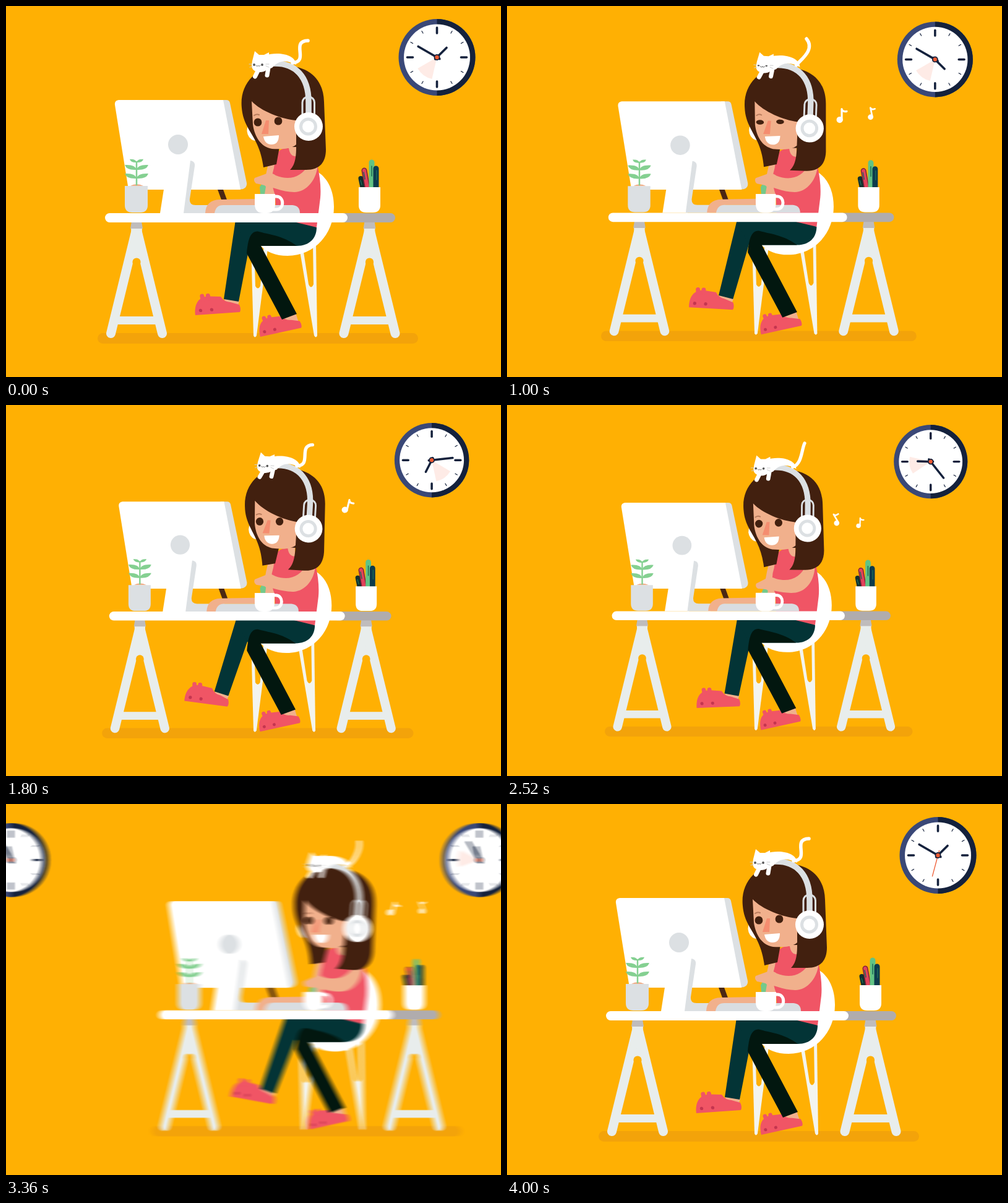
These frames come from a looping animation (800 by 600 pixels, 4.04 s). An HTML page:

```html
<!DOCTYPE html>
<html lang="en">
<head>
<meta charset="utf-8">
<title>Working day</title>
<style>
html, body { margin: 0; height: 100%; overflow: hidden; background: #ffb003 }
svg { display: block; width: 100%; height: 100% }
.skin { fill: #f1b08c }
.hair { fill: #42200f }
.grey { fill: #dce0e3 }
.pink { fill: #f05565 }
.teal { fill: #033436 }
.bg { fill: #ffb003 }
.line { fill: none; stroke-linecap: round; stroke-linejoin: round }
.w { fill: #fff }
</style>
</head>
<body>
<svg viewBox="0 0 800 600">
<defs>
  <filter id="blur" filterUnits="userSpaceOnUse" x="-60" y="0" width="920" height="600" color-interpolation-filters="sRGB">
    <feConvolveMatrix id="smear" order="3 1" kernelMatrix="1 1 1" edgeMode="none" preserveAlpha="false"/>
  </filter>
  <g id="trestle">
    <path d="M202 358H220L218 414H204Z" fill="#e8edec"/>
    <path d="M209.5 366L169.5 529.5M212.5 366L252.5 529.5" class="line" stroke="#e8edec" stroke-width="15"/>
    <path d="M178 502H244V515H178Z" fill="#e8edec"/>
    <circle cx="211" cy="414" r="6.6" class="bg"/>
    <path d="M203 348H219L221 360H201Z" fill="#bfbcbc"/>
  </g>
  <g id="slipper">
    <path d="M0 0C-1 -20 9 -30 24 -29L43 -27Q48 -18 58 -17L72 -12Q75 -4 72 0Z" class="pink"/>
    <path d="M14 -24L13 -30M23 -25L22.5 -30" class="line" stroke="#f05565" stroke-width="7"/>
    <g fill="#c4354f"><circle cx="9" cy="-7" r="2.7"/><circle cx="27" cy="-7" r="2.7"/></g>
  </g>
  <g id="leaves" fill="#84d091">
    <path id="leaf" d="M0 0Q2 -9 19 -8Q16 1 0 0Z"/>
    <use href="#leaf" transform="scale(-1 1)"/>
  </g>
  <g id="note">
    <circle cy="8" r="5.2" class="w"/>
    <path d="M3.5 8L1.5 -10Q3 -5 10 -7" class="line" stroke="#fff" stroke-width="3.2"/>
  </g>
</defs>

<rect width="800" height="600" class="bg"/>
<g id="camera">
<g id="main"><g id="scene">
  <rect x="148" y="529" width="518" height="17" rx="8.5" fill="#f3a30a"/>

  <!-- chair -->
  <g fill="#f3f4ee">
    <path d="M396 385H424L405 533Q402 538 400 533Z"/>
    <path d="M473 385H501L503 533Q501 538 498 533Z"/>
  </g>
  <path d="M401 385H417L411 453Q407 460 403 453ZM479 385H496L497 450Q493 459 489 450Z" class="bg"/>
  <path d="M500 266C521 277 530 300 530 325C530 370 497 404 455 404C436 404 420 398 410 386L490 345Z" class="w"/>

  <!-- legs -->
  <g id="shin">
    <g id="foot">
      <path d="M354 472L377 476L374 489L351 487Z" class="skin"/>
      <use href="#slipper" transform="translate(306 500) rotate(-4)"/>
    </g>
    <path d="M371 346L352 474L376 478L394 385L402 350Z" class="teal"/>
  </g>
  <path d="M372 343H470L502 358C502 376 490 388 470 388H412L394 392L371 352Z" class="teal"/>
  <path d="M446 504L468 496L473 512L450 518Z" class="skin"/>
  <use href="#slipper" transform="translate(411 535) rotate(-12.4) scale(.94)"/>
  <path d="M389 400C391 380 394 364 407 364.5C422 369 448 371 470 388H412L470 498L446 507Z" fill="#02170f"/>

  <use href="#trestle"/>
  <use href="#trestle" x="376.5"/>

  <!-- computer -->
  <path d="M341 294H350L358 316H349Z" fill="#4a2713"/>
  <path d="M345 152H356Q361 152 362 157L389 286Q390 293 383 296L376 297Z" class="grey"/>
  <path d="M182 152H351L379 297H198L176 160Q175 153 182 152Z" class="w"/>
  <circle cx="278" cy="224" r="16" class="grey"/>
  <path d="M256 290H300L290 335H249Z" class="w"/>
  <path d="M298 250Q306 251 305 259L297 312Q296 322 306 322H326V335H287Z" class="grey"/>

  <!-- plant -->
  <path d="M201 291Q211 285 222 291Z" class="skin"/>
  <path d="M192 291H229V322Q229 334 217 334H204Q192 334 192 322Z" class="grey"/>
  <path d="M211 252V289" class="line" stroke="#84d091" stroke-width="2.5"/>
  <use href="#leaves" transform="translate(211 253) scale(.58 .65)"/>
  <use href="#leaves" transform="translate(211 265)"/>
  <use href="#leaves" transform="translate(211 279)"/>

  <!-- pens -->
  <g class="line">
    <path d="M577 296L573.5 279" stroke="#12302c" stroke-width="8"/>
    <path d="M584 294L579 266" stroke="#7d2338" stroke-width="9"/>
    <path d="M584 294L579 266" stroke="#e2435a" stroke-width="6"/>
    <path d="M591 294V253" stroke="#62c384" stroke-width="9"/>
    <path d="M598 294V263" stroke="#0d3b4c" stroke-width="9"/>
    <path d="M591 275V259M580 280L578 269M599 281V266M575 289L573 282" stroke="#1c6a58" stroke-width="1.5"/>
  </g>
  <path d="M570 293H605V322Q605 334 593 334H582Q570 334 570 322Z" class="w"/>

  <!-- body -->
  <path d="M424 255H440V306L405 322H352Q342 325 339 335H322Q323 314 345 313L402 312L415 300L421 268Z" class="skin"/>
  <path d="M450 215H469V245H450Z" class="skin"/>
  <path d="M436 243Q441 229 457 230Q459 243 468 243L503 256Q510 287 508 310L502 358L465 349H437L435 306Q426 282 433 262Z" class="pink"/>
  <path d="M337 335Q339 322 351 322H463Q475 323 475 335Z" fill="#d9dde1"/>
  <g id="arm">
    <path d="M414 286L420 292L418 304H411L410 293Z" fill="#74c98b"/>
    <path d="M504 252C504 280 486 301 466 301C446 301 428 291 404 287Q399 283 402 278L424 270Q431 270 436 274C458 283 478 277 489 256Z" class="skin"/>
  </g>
  <path d="M434 308H437C450 308 450 329 437 329H432" class="line" stroke="#fff" stroke-width="5"/>
  <path d="M402 304H435V320Q435 335 421 335H416Q402 335 402 320Z" class="w"/>

  <!-- head -->
  <g id="head">
    <ellipse cx="400" cy="204" rx="10" ry="14" transform="rotate(-20 400 204)" class="w"/>
    <path d="M381 165C377 128 402 97 446 96C490 96 513 118 514 155L517 232C517 255 505 265 485 265H459C466 258 469 248 469 228H442L437 256L416 261C414 245 410 232 404 220C396 203 383 190 381 165Z" class="hair"/>
    <path d="M397 154C412 170 445 183 469 185V224C462 231 445 232 430 231C412 228 402 212 399 192Z" class="skin"/>
    <path d="M420 185H425L424 207H413Z" fill="#f58d70"/>
    <path d="M401 177Q405 174 409 176" class="line" stroke="#b97c5d" stroke-width="2"/>
    <g class="hair"><ellipse class="eye" cx="407" cy="188" rx="6.4"/><ellipse class="eye" cx="440" cy="186" rx="6.4"/></g>
    <path d="M416 211L441 209C441 220 436 224 429 224C421 224 417 218 416 211Z" class="w"/>

    <g class="line" stroke="#dce0e3">
      <path d="M431 93C468 91 489 115 489 155V180" stroke-width="9.5"/>
      <rect x="479" y="147" width="19.5" height="50" rx="9" stroke-width="3"/>
    </g>
    <circle cx="489" cy="195" r="23" class="w"/>
    <circle cx="488.5" cy="195" r="12" fill="none" stroke="#dce0e3" stroke-width="5"/>

    <path id="tail" class="line" stroke="#fff" stroke-width="5.5"/>
    <path d="M418 80C440 73 468 78 469 95C452 86 440 88 430 100L418 104Z" class="w"/>
    <path d="M408 103L402.5 114M424 100L422 112" class="line" stroke="#fff" stroke-width="7"/>
    <path d="M398 89L402 73L409 79H417L425 75L426 94Q423 107 410 107Q397 106 397 96Z" class="w"/>
    <g fill="#555"><ellipse class="cat" cx="401" cy="95" rx="1.9"/><ellipse class="cat" cx="414" cy="95" rx="1.9"/></g>
    <path d="M404 96Q406 99 407.5 96Q409 99 411 96" class="line" stroke="#777" stroke-width="1"/>
    <path d="M393 94H397M394 99L398 98M420 94H425M420 97L425 99" class="line" stroke="#ccc" stroke-width="1"/>
  </g>
  <g id="notes"></g>

  <!-- desk top -->
  <path d="M540 342.5H621.5" class="line" stroke="#b0acad" stroke-width="15"/>
  <path d="M167.5 342.5H544.5" class="line" stroke="#fff" stroke-width="15"/>

  <!-- clock -->
  <g transform="translate(696.5 83)">
    <circle r="62" fill="#3a4877"/>
    <path d="M0 -62A62 62 0 0 1 0 62Z" fill="#14213c"/>
    <circle r="53.5" class="w"/>
    <g id="ticks" stroke="#14213c" stroke-linecap="round"></g>
    <path id="sweep" fill="#f9a48c" opacity=".22"/>
    <path id="hour" d="M0 4V-22" class="line" stroke="#14213c" stroke-width="3.6"/>
    <path id="minute" d="M0 5V-35" class="line" stroke="#14213c" stroke-width="3.6"/>
    <path id="second" d="M0 8V-35" class="line" stroke="#ee5a32" stroke-width="1.3"/>
    <circle r="5" fill="#14213c"/>
    <circle r="3.2" fill="#ee5a32"/>
  </g>
</g></g>
<use id="ghost" href="#scene"/>
</g>
</svg>
<script>
const FRAME = 40, LOOP = 4040, CYCLE = 4000;
const $ = id => document.getElementById(id);
const set = (id, name, value) => $(id).setAttribute(name, value);
const turn = (id, angle, pivot = '0 0') => set(id, 'transform', `rotate(${angle} ${pivot})`);
const mix = (a, b, k) => a + (b - a) * k;
const swing = (t, n) => (1 - Math.cos(2 * Math.PI * n * t / CYCLE)) / 2;

$('ticks').innerHTML = Array.from({length: 12}, (_, i) => i % 3
  ? `<path d="M0 -45V-49" stroke-width="1.2" transform="rotate(${i * 30})"/>`
  : `<path d="M0 -39V-48" stroke-width="3.6" transform="rotate(${i * 30})"/>`).join('');

const zoomKeys = [[0, 1], [2600, .959], [3250, .959], [3680, .982], [3960, 1], [LOOP, 1]];
function zoom(t) {
  const i = zoomKeys.findIndex(k => k[0] > t);
  const [t0, a] = zoomKeys[i - 1], [t1, b] = zoomKeys[i];
  return mix(a, b, (t - t0) / (t1 - t0));
}

// Eased progress of the sideways whip: a Bezier timing curve, solved by bisection
function pan(t) {
  const u = Math.min(1, Math.max(0, (t - 3000) / 1000));
  const x = s => 3 * .814 * s * (1 - s) ** 2 + 3 * .408 * s * s * (1 - s) + s ** 3;
  if (u === 0 || u === 1) return u;
  let low = 0, high = 1;
  for (let i = 0; i < 30; i++) {
    const mid = (low + high) / 2;
    if (x(mid) < u) low = mid; else high = mid;
  }
  return low * low * (3 - 2 * low);
}

// start, life, x, y, speed x, speed y, angle, spin, size
const notes = [
  [560, 1380, 533, 183, .0175, -.02, -38, .1, 1],
  [2380, 1380, 533, 183, .0175, -.02, -38, .1, 1],
  [560, 860, 578, 183, .027, -.0274, 12, -.04, .85],
  [2380, 1180, 572, 189, .027, -.0274, 12, -.03, .85]
];
function noteMarkup(t) {
  return notes.map(([start, life, x, y, vx, vy, angle, spin, size]) => {
    const p = t - start;
    if (p <= 0 || p >= life) return '';
    const scale = size * Math.min(1, .4 + p / 300);
    const fade = Math.min(1, (life - p) / 120);
    return `<use href="#note" opacity="${fade}" transform="translate(${x + vx * p} ${y + vy * p}) rotate(${Math.min(20, angle + spin * p)}) scale(${scale})"/>`;
  }).join('');
}

function drawClock(t) {
  turn('hour', 45 + .09 * t);
  turn('minute', 300 + 1.08 * t);
  const still = t === CYCLE, start = 193 + 2.16 * t;
  turn('second', 195);
  set('second', 'visibility', still ? 'visible' : 'hidden');
  const point = a => [36 * Math.sin(a * Math.PI / 180), -36 * Math.cos(a * Math.PI / 180)];
  set('sweep', 'd', still ? '' : `M0 0L${point(start)}A36 36 0 0 1 ${point(start + 47)}Z`);
}

function drawCamera(t) {
  const s = zoom(t), p = pan(t), gap = 757 + .103 * (t - 3360);
  const place = x => `translate(${400 + x} 300) scale(${s}) translate(-400 -300)`;
  const moving = p > 0 && p < 1;
  set('main', 'transform', place(moving ? (p - 1) * gap : 0));
  set('ghost', 'transform', place(p * gap));
  set('ghost', 'visibility', moving ? 'visible' : 'hidden');

  // Even smear over half a frame of travel, always an odd number of pixels
  const travel = (pan(t + 10) - pan(t - 10)) * gap;
  const width = 2 * Math.round(travel / 2) + 1;
  if (width > 1) {
    set('smear', 'order', `${width} 1`);
    set('smear', 'kernelMatrix', Array(width).fill(1).join(' '));
    set('camera', 'filter', 'url(#blur)');
  } else $('camera').removeAttribute('filter');
}

function draw(t) {
  const bob = swing(t, 3);
  turn('shin', 10.5 * bob, '384 354');
  turn('foot', 4 * bob, '364 478');
  turn('head', 4.4 * bob, '455 240');
  turn('arm', -6.7 * swing(t, 4), '490 275');

  const k = swing(t, 2);
  set('tail', 'd', `M463 92C${mix(491, 468, k)} ${mix(90, 84, k)} ${mix(459, 494, k)} ${mix(57, 66, k)} ${mix(488, 478, k)} ${mix(56, 48, k)}`);

  const open = Math.min(1, ...[1060, 3740].map(b => Math.abs(t - b) / 120));
  document.querySelectorAll('.eye').forEach(e => e.setAttribute('ry', mix(.8, 6.6, open)));
  document.querySelectorAll('.cat').forEach(e => e.setAttribute('ry', mix(.4, 1.9, open)));

  $('notes').innerHTML = noteMarkup(t);
  drawClock(t);
  drawCamera(t);
}

const begin = performance.now();
function tick() {
  const t = (performance.now() - begin) % LOOP;
  draw(Math.floor(t / FRAME) * FRAME);
  requestAnimationFrame(tick);
}
tick();
</script>
</body>
</html>
```
